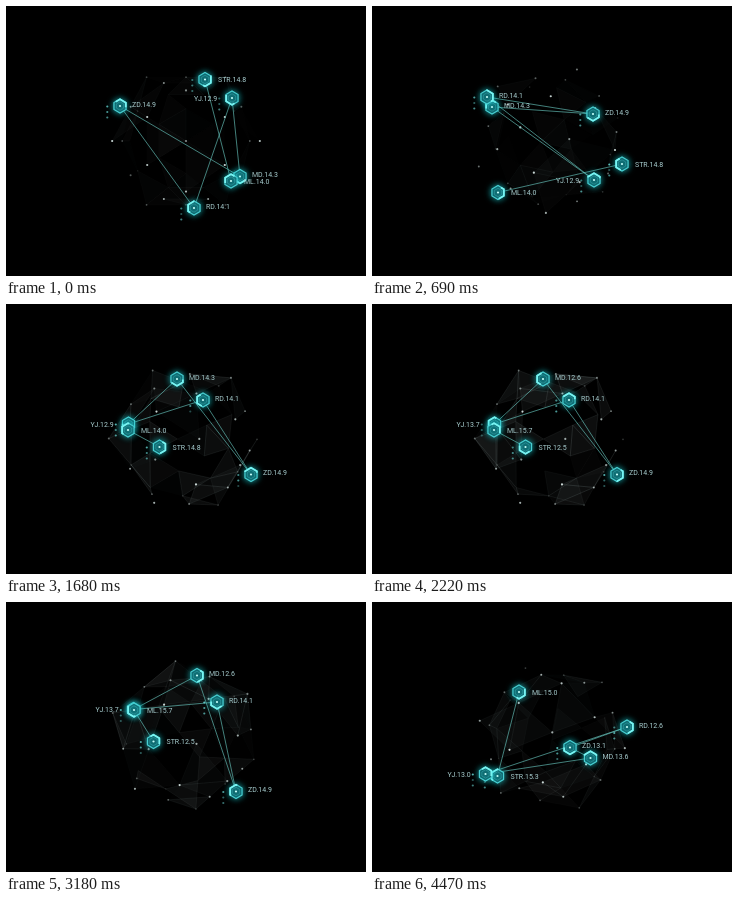
These frames come from a looping animation (360x270 px, 4500 ms). An HTML page with a canvas:

```html
<!DOCTYPE html>
<html lang="en">
<head>
<meta charset="utf-8">
<title>Node sphere</title>
<style>
  html, body { margin: 0; width: 100%; height: 100%; overflow: hidden; background: #000; }
  canvas { display: block; width: 360px; height: 270px; }
</style>
</head>
<body>
<canvas id="stage"></canvas>
<script>
const W = 360, H = 270, CX = 180, CY = 135;
const LOOP = 4500, RADIUS = 75, CAMERA = 290;
const canvas = document.getElementById('stage');
const ctx = canvas.getContext('2d');
const ratio = window.devicePixelRatio || 1;
canvas.width = W * ratio;
canvas.height = H * ratio;

// Vector helpers
const add = (a, b) => a.map((v, i) => v + b[i]);
const sub = (a, b) => a.map((v, i) => v - b[i]);
const scale = (a, s) => a.map(v => v * s);
const dot = (a, b) => a[0] * b[0] + a[1] * b[1] + a[2] * b[2];
const norm = a => scale(a, 1 / (Math.hypot(...a) || 1));
const mix = (a, b, f) => a.map((v, i) => v + (b[i] - v) * f);
const cross = (a, b) => [
  a[1] * b[2] - a[2] * b[1],
  a[2] * b[0] - a[0] * b[2],
  a[0] * b[1] - a[1] * b[0]
];
const clamp = v => Math.min(1, Math.max(0, v));
const ease = v => {
  const u = clamp(v);
  return u < 0.5 ? 4 * u ** 3 : 1 - 4 * (1 - u) ** 3;
};

const nodes = [
  { name: 'MD', values: [14.3, 12.6, 13.6], dx: 12, dy: -2 },
  { name: 'RD', values: [14.1, 14.1, 12.6], dx: 12, dy: -2, ticks: true },
  { name: 'ZD', values: [14.9, 14.9, 13.1], dx: 12, dy: -2, ticks: true },
  { name: 'STR', values: [14.8, 12.5, 15.3], dx: 13, dy: 0, ticks: true },
  { name: 'YJ', values: [12.9, 13.7, 13.0], dx: -38, dy: 0, ticks: true },
  { name: 'ML', values: [14.0, 15.7, 15.0], dx: 13, dy: 0 }
];
const links = [[2, 1], [2, 0], [4, 1], [4, 0], [5, 3]];

// Node places on screen with the side of the sphere: 1 front, -1 back, 0 rim
const layouts = [
  [[234, 170.5, 1], [188, 202, 1], [114, 100, -1], [199, 73.5, -1], [226, 92, -1], [225, 175, -1]],
  [[120, 101, 1], [115, 91, 0], [221, 108, -1], [250, 158, 1], [222, 174, 1], [126, 186.5, 0]],
  [[171, 75, -1], [197, 96, -1], [245, 170.5, 0], [153.5, 143, 1], [122.5, 120, 1], [122, 126, -1]],
  [[191, 73.5, -1], [211, 100, -1], [230, 189.5, 0], [147.5, 139.5, 1], [127.5, 107.5, 1], [128, 108, -1]],
  [[238, 96, 1], [247, 96, 0], [185, 182.5, -1], [129, 188, 1], [126, 157.5, 1], [157, 64, 0]],
  [[218.5, 156, 1], [255, 125, 1], [198, 145.5, -1], [125.5, 174, -1], [113.5, 172, -1], [147, 90, 1]]
];

function lift([px, py, side]) {
  const x = px - CX, y = py - CY, r = Math.hypot(x, y), k = r / CAMERA;
  const root = Math.sqrt(Math.max(0, (1 + k * k) * RADIUS ** 2 - r * r));
  const z = (r * k + side * root) / (1 + k * k);
  return [x * (1 - z / CAMERA), y * (1 - z / CAMERA), z];
}

function project([x, y, z]) {
  const s = 1 / (1 - z / CAMERA);
  return [CX + x * s, CY + y * s];
}

const toLocal = (axes, p) => axes.map(a => dot(a, p));
const toWorld = (axes, c) => axes.reduce((sum, a, i) => add(sum, scale(a, c[i])), [0, 0, 0]);

const poses = layouts.map(layout => {
  const p = layout.map(lift);
  const u = norm(sub(p[0], p[2]));
  const w = norm(cross(u, sub(p[5], p[4])));
  const axes = [u, cross(w, u), w];
  return { axes, local: p.map(v => toLocal(axes, v)) };
});

const track = [[0, 0], [690, 1], [1320, 2], [2600, 2], [3180, 3], [3630, 4], [4400, 5], [LOOP, 5]];
const glide = t => ease(t / 1320) + ease((t - 2600) / 1800);

function rotate(v, axis, angle) {
  const c = Math.cos(angle), s = Math.sin(angle);
  return add(add(scale(v, c), scale(cross(axis, v), s)), scale(axis, dot(axis, v) * (1 - c)));
}

function turn(from, to, f) {
  const sum = from.reduce((acc, a, i) => add(acc, cross(a, to[i])), [0, 0, 0]);
  const trace = from.reduce((acc, a, i) => acc + dot(a, to[i]), 0);
  const angle = Math.atan2(Math.hypot(...sum), trace - 1);
  return from.map(a => rotate(a, norm(sum), angle * f));
}

function poseAt(t) {
  let i = 0;
  while (i < track.length - 2 && t >= track[i + 1][0]) i++;
  const [t0, a] = track[i], [t1, b] = track[i + 1];
  const f = a === b ? 0 : (glide(t) - glide(t0)) / (glide(t1) - glide(t0));
  const axes = turn(poses[a].axes, poses[b].axes, f);
  const points = poses[a].local.map((c, n) => toWorld(axes, mix(c, poses[b].local[n], f)));
  return { axes, points };
}

// Icosahedron with each face split in four, the edge midpoints left flat
const mesh = (() => {
  const phi = (1 + Math.sqrt(5)) / 2, points = [], faces = [], middles = {};
  for (const a of [-1, 1]) for (const b of [-phi, phi])
    points.push([0, a, b], [a, b, 0], [b, 0, a]);
  const near = (i, j) => Math.hypot(...sub(points[i], points[j])) < 2.1;
  const middle = (i, j) => {
    const key = i + '-' + j;
    if (!(key in middles)) middles[key] = points.push(mix(points[i], points[j], 0.5)) - 1;
    return middles[key];
  };
  for (let i = 0; i < 12; i++) for (let j = i + 1; j < 12; j++) for (let k = j + 1; k < 12; k++) {
    if (!near(i, j) || !near(j, k) || !near(i, k)) continue;
    const a = middle(i, j), b = middle(j, k), c = middle(i, k);
    faces.push([i, a, c], [a, j, b], [c, b, k], [a, b, c]);
  }
  const size = RADIUS / Math.hypot(1, phi);
  return { faces, local: points.map(p => toLocal(poses[0].axes, scale(p, size))) };
})();

const noise = n => {
  const v = Math.sin(n * 127.1) * 43758.5453;
  return v - Math.floor(v);
};

function polygon(points) {
  ctx.beginPath();
  points.forEach(([x, y]) => ctx.lineTo(x, y));
  ctx.closePath();
}

function drawMesh(axes, t) {
  const world = mesh.local.map(c => toWorld(axes, c));
  const flat = world.map(project);
  const calm = 0.35 + 0.65 * ease((t - 450) / 900) * (1 - 0.6 * ease((t - 2700) / 900));
  ctx.lineWidth = 0.6;
  mesh.faces.forEach((face, i) => {
    const pulse = Math.sin(noise(i + 1) * 6.28 + t / 900);
    const glow = Math.max(0, pulse - 0.2) * calm;
    if (!glow) return;
    polygon(face.map(n => flat[n]));
    ctx.fillStyle = `rgba(190,205,205,${0.085 * glow})`;
    ctx.strokeStyle = `rgba(190,210,210,${0.17 * glow})`;
    ctx.fill();
    ctx.stroke();
  });
  flat.forEach(([x, y], i) => {
    const depth = clamp(0.4 + world[i][2] / RADIUS);
    const alpha = depth * (0.55 + 0.45 * noise(i + 7));
    ctx.fillStyle = `rgba(225,240,238,${alpha})`;
    ctx.beginPath();
    ctx.arc(x, y, 0.75 + 0.35 * depth, 0, Math.PI * 2);
    ctx.fill();
  });
}

function hexagon(x, y, r) {
  polygon(Array.from({ length: 6 }, (_, i) => {
    const a = (i + 0.5) * Math.PI / 3;
    return [x + r * Math.cos(a), y + r * Math.sin(a)];
  }));
}

function drawNode([x, y], i, t) {
  ctx.save();
  ctx.shadowColor = 'rgba(30,220,225,.8)';
  ctx.shadowBlur = 6 * ratio;
  hexagon(x, y, 7);
  ctx.fillStyle = 'rgba(14,92,99,.88)';
  ctx.fill();
  ctx.lineWidth = 1.2;
  ctx.strokeStyle = '#48cfd2';
  ctx.stroke();
  ctx.shadowBlur = 0;

  // Brighter rim running round the hexagon
  hexagon(x, y, 6.7);
  ctx.setLineDash([16, 24.2]);
  ctx.lineDashOffset = -(i * 11 + t / 45);
  ctx.lineWidth = 1.8;
  ctx.strokeStyle = '#78f4f2';
  ctx.stroke();
  ctx.setLineDash([]);

  hexagon(x, y, 4.2);
  ctx.lineWidth = 0.6;
  ctx.strokeStyle = 'rgba(80,200,205,.55)';
  ctx.stroke();
  ctx.fillStyle = '#c4fffb';
  ctx.beginPath();
  ctx.arc(x, y, 1.1, 0, Math.PI * 2);
  ctx.fill();
  ctx.restore();
}

function drawTicks([x, y], i, t) {
  for (let k = 0; k < 3; k++) {
    const flicker = noise(i * 9 + k + Math.floor(t / 150) * 3.7);
    ctx.fillStyle = `rgba(110,225,222,${0.45 + 0.4 * flicker - 0.08 * k})`;
    ctx.beginPath();
    ctx.arc(x - 12.7, y + 0.5 + k * 5.5, 1.1, 0, Math.PI * 2);
    ctx.fill();
  }
}

function drawLabel([x, y], { name, values: [a, b, c], dx, dy }, t) {
  const value = a + (b - a) * clamp((t - 1750) / 430) + (c - b) * clamp((t - 3950) / 510);
  ctx.fillStyle = '#a9cfd1';
  ctx.fillText(`${name}.${value.toFixed(1)}`, x + dx, y + dy + 0.5);
}

function draw(t) {
  ctx.setTransform(ratio, 0, 0, ratio, 0, 0);
  ctx.fillStyle = '#000';
  ctx.fillRect(0, 0, W, H);
  const { axes, points } = poseAt(t);
  const places = points.map(project);
  drawMesh(axes, t);

  ctx.lineWidth = 0.8;
  ctx.strokeStyle = 'rgba(105,200,192,.8)';
  links.forEach(([a, b]) => {
    ctx.beginPath();
    ctx.moveTo(...places[a]);
    ctx.lineTo(...places[b]);
    ctx.stroke();
  });

  ctx.font = '7px Roboto, sans-serif';
  ctx.textBaseline = 'middle';
  nodes.forEach((node, i) => {
    if (node.ticks) drawTicks(places[i], i, t);
    drawNode(places[i], i, t);
  });
  nodes.forEach((node, i) => drawLabel(places[i], node, t));
}

let begin;
function tick(now) {
  begin ??= now;
  draw((now - begin) % LOOP);
  requestAnimationFrame(tick);
}
draw(0);
requestAnimationFrame(tick);
</script>
</body>
</html>
```
